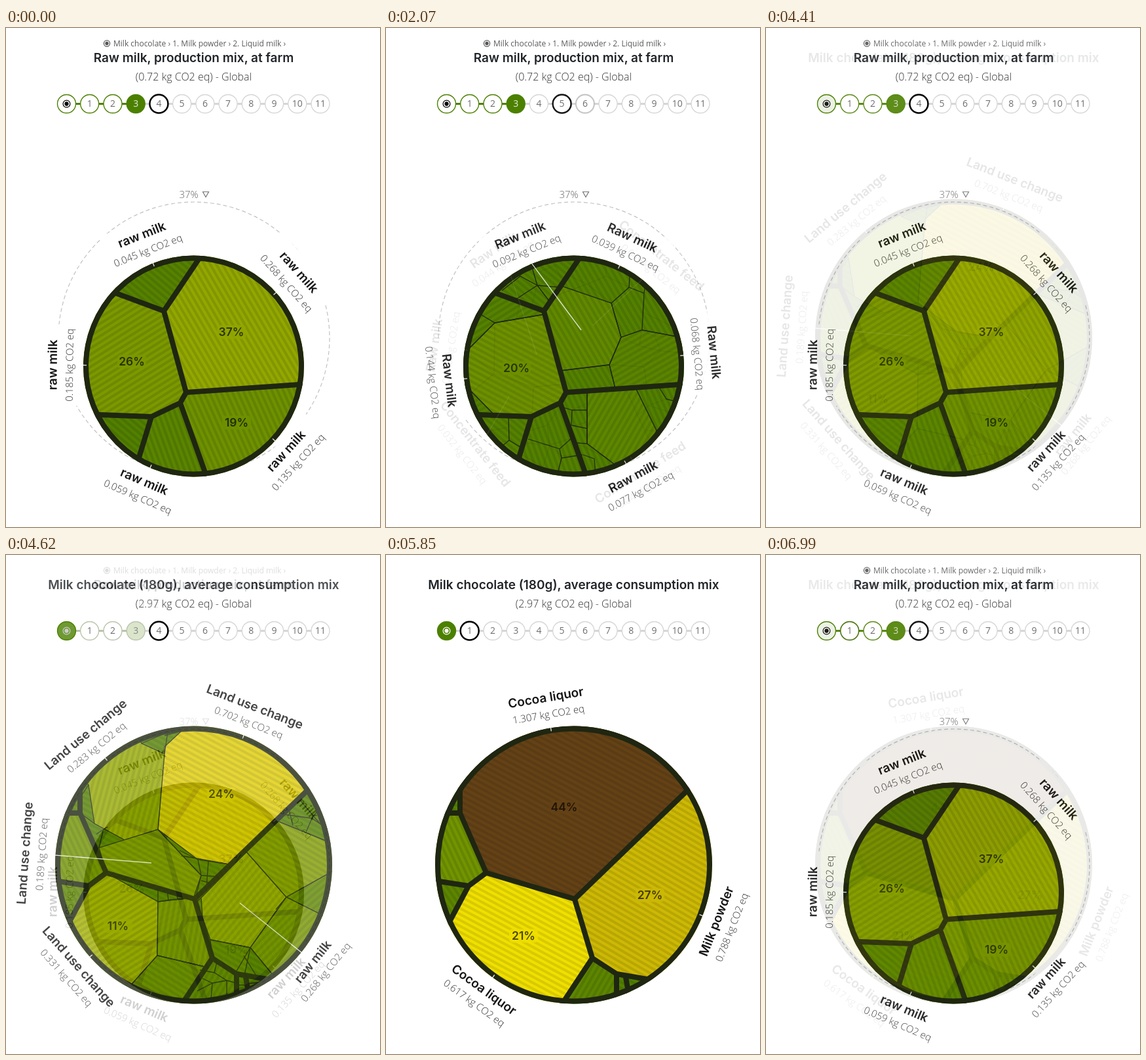
Animation, 571 px wide and 760 px high, one loop 7020 ms. Source, as an HTML page:

```html
<!DOCTYPE html>
<html lang="en">
<head>
<meta charset="utf-8">
<title>Footprint map</title>
<style>
html, body { margin: 0; width: 100%; height: 100%; overflow: hidden; background: #fff; }
svg { display: block; width: 100%; height: 100%; }
text { font-family: "Open Sans", sans-serif; font-weight: 300; text-anchor: middle; fill: #333; }
.bold { font: 600 19px Inter, sans-serif; fill: #161616; }
.title { fill: #212529; }
.share { font: 600 17.5px Inter, sans-serif; fill: #000; fill-opacity: .68; }
.crumbs { font-weight: 400; font-size: 12px; fill: #5a5a5a; text-anchor: start; }
</style>
</head>
<body>
<svg viewBox="0 0 571 760" xmlns="http://www.w3.org/2000/svg">
  <defs id="defs"></defs>
  <use id="base"/>
  <use id="over"/>
</svg>
<script>
const INK = '#1f2611', GREEN = '#4c8000', GREY = '#d6d6d6';
const HOLD = 900, STEP = 30, SPAN = 1170;
const ORDER = ['farm4', 'farm5', 'farm6', 'farm4', 'bar4', 'bar1'];

const milkDisc = { id: 'milk', x: 286.5, y: 515, r: 168.5 };
const barDisc = { id: 'bar', x: 286.5, y: 472, r: 211.5 };

// Borders between the main areas of each disc
const milkWalls = 'M160 401L241 431L299 345M241 431L275 555L470 541.5M275 555L266 571L308 688' +
  'M266 571L222 592L130 588.5M222 592L200 664';
const barWalls = 'M470 349L288 524L153 484L113 393V350M113 393H80M153 484L126 504L74 496M126 504L94 564' +
  'M288 524L315 614L268 685M315 614L352 638L410 648M352 638V672M366 643L371 672';

// Cells: value in kg, stripe angle, corners
const milkCells = [
  [.045, -50, '160,401 241,431 299,345 200,320'],
  [.268, -30, '241,431 299,345 470,330 480,541 275,555'],
  [.185, 58, '241,431 275,555 266,571 222,592 110,588 100,450 160,401'],
  [.135, -24, '275,555 480,541 470,690 308,690 266,571'],
  [.059, -20, '266,571 308,690 198,690 200,664 222,592'],
  [.03, -50, '222,592 200,664 120,680 110,588']
];
const barSmall = [
  [.15, -25, '153,484 113,393 70,393 70,495 126,504'],
  [.07, -35, '126,504 70,495 80,575 94,564'],
  [.07, 30, '315,614 352,638 352,690 268,685']
];
const greens = milkCells.map(([, a, pts], i) => [.03 + i % 3 * .006, a, pts]);

const scenes = {
  farm4: {
    disc: milkDisc, walls: milkWalls, ring: 4, cells: milkCells, thin: [],
    shares: [[344, 463, 37, .268], [192, 508, 26, .185], [352, 601, 19, .135]],
    labels: [[48.3, 'raw milk', .268], [-89.5, 'raw milk', .185], [-21.6, 'raw milk', .045],
      [132.5, 'raw milk', .135], [-156.8, 'raw milk', .059]]
  },
  farm5: {
    disc: milkDisc, walls: milkWalls, ring: 5,
    cells: [...greens,
      [.092, -30, '241,431 268,393 344,419 359,471 341,513 266,522'],
      [.068, 60, '359,471 391,460 460,473 460,542 350,549 341,513'],
      [.144, -62, '166,449 242,436 275,555 266,571 222,592 165,589 118,541 118,497'],
      [.077, 30, '307,554 381,548 413,613 390,664 352,667 307,633']],
    thin: [
      'M268 393L344 419L371 395L373 362M371 395L394 404L398 376M394 404L391 460L455 472M344 419L359 471L391 460' +
      'M359 471L341 513L350 549M341 513L266 522',
      'M307 554V633L352 667M271 578L284 582H307M284 582L283 605L307 610M307 633L292 632M381 548L413 613L445 600' +
      'M416 546L428 565L450 571M301 650L318 656L320 682',
      'M217 626L265 641L283 625M265 641L268 655L300 650M268 655L261 682M187 592L188 628L208 640M188 628L178 636',
      'M166 449L242 436M166 449L134 430M166 449L118 497M118 541L165 589',
      'M221 358L231 392L266 395M231 392L197 414M231 392L250 417M231 392L205 378L177 400'],
    shares: [[199, 518, 20, .144]],
    labels: [[-22.3, 'Raw milk', .092, 298, 460], [24.6, 'Raw milk', .039], [84.4, 'Raw milk', .068],
      [151.7, 'Raw milk', .077], [-96.6, 'Raw milk', .144]]
  },
  farm6: {
    disc: milkDisc, walls: milkWalls, ring: 6,
    cells: [...greens,
      [.049, -30, '241,431 264,406 307,390 344,419 359,471 341,513 266,522'],
      [.044, 58, '166,449 242,436 273,542 225,547 165,526'],
      [.04, -62, '166,449 165,526 130,556 118,497'],
      [.032, 40, '165,526 225,547 223,592 140,588 130,556'],
      [.041, 30, '307,554 366,549 384,590 408,640 360,666 307,640']],
    thin: [
      'M264 406L307 390L344 419L359 471L341 513L350 549M307 390L277 376M307 390L336 378V352M336 378L371 395L373 362' +
      'M371 395L397 404L398 376M397 404L391 432L452 462M344 419L371 395M391 432L390 460L359 471M390 460L410 470L453 468',
      'M341 513L266 522M359 471L341 513L394 516L420 492L455 495M394 516L398 546M390 460L387 484L359 471M387 484L420 492L410 470',
      'M307 554V640L360 666M271 578L284 582L307 572M284 582L286 606L307 600M366 549L384 590L408 640M384 590L401 575L448 590' +
      'M401 575L396 546M401 575L428 565L418 545M395 613L432 614M286 632L307 640M307 640L318 680',
      'M217 614L246 605L262 582M246 605L250 635L283 625M250 635L268 652L298 650M250 635L240 668L208 650M268 652L264 682M215 632L250 635',
      'M187 592L188 628L208 640M188 628L172 632M187 608L156 614M166 449L242 436M166 449L134 430M166 449L118 497' +
      'M118 488L165 526L225 547L273 542M225 547L223 592M165 526L130 556M205 417L199 444',
      'M221 358L231 392L266 395M231 392L197 414M231 392L250 417M231 392L205 378L177 400M205 378L198 364M222 376L258 362L270 386M231 392L222 424'],
    shares: [],
    labels: [[-34.7, 'Raw milk', .044, 230, 497], [38.5, 'Concentrate feed', .049, 316, 453],
      [-81.5, 'Raw milk', .04], [-128.3, 'Concentrate feed', .032, 188, 561], [147.9, 'Concentrate feed', .041]]
  },
  bar4: {
    disc: barDisc, walls: barWalls, ring: 4, bar: true,
    cells: [...barSmall,
      [.702, -62, '232,418 242,292 268,268 300,240 480,240 470,349 340,471 293,464'],
      [.283, 15, '232,418 242,303 207,287 190,250 105,330 126,350 135,409 181,434'],
      [.189, -62, '232,418 142,446 153,484 286,523 298,488'],
      [.331, 58, '126,504 153,484 232,528 231,610 188,658 80,620 94,564'],
      [.18, 10, '232,528 251,525 288,522 314,610 303,627 231,610'],
      [.13, -58, '231,610 303,627 268,685 230,700 188,658'],
      [.268, 40, '298,522 367,452 428,521 373,598 312,586 300,552'],
      [.2, -60, '367,452 414,405 500,440 500,481 428,521'],
      [.08, 50, '428,521 500,481 510,560 488,552'],
      [.16, 45, '428,521 494,554 460,620 412,645 373,598'],
      [.08, -60, '312,586 373,598 364,640 352,638 315,614']],
    thin: [
      'M242 275L268 268M207 287L242 272M242 303L248 262M113 393L135 409M138 425L155 414M142 446L148 421M113 370L126 350' +
      'M232 418L298 488M265 450L293 464M268 458L340 471M293 464L298 488L325 490M309 467L306 506M298 488L290 520M298 496L314 500',
      'M232 528V508M246 511L248 526M260 515L262 524M276 520V523M232 528L288 522M231 610L303 627',
      'M428 521L412 540M414 405L500 440M423 395L467 401L459 420M447 371L480 410M467 401L480 384M432 388L438 412M467 401L492 418' +
      'M428 521L494 554M373 598L412 645M373 598L350 637M363 610L384 644M288 531L298 522',
      'M300 645L315 652L313 676M315 652L337 648L352 652M337 648V674M296 632L318 636L337 648M318 636L322 620M315 652L292 664' +
      'M352 655H366M369 653L392 650M373 668L392 650'],
    shares: [[329, 364, 24, .702], [171, 565, 11, .331]],
    labels: [[21.2, 'Land use change', .702], [-39.7, 'Land use change', .283], [-86, 'Land use change', .189, 222, 469],
      [-131.5, 'Land use change', .331], [129, 'raw milk', .268, 357, 530]]
  },
  bar1: {
    disc: barDisc, walls: barWalls, ring: 1, bar: true,
    cells: [...barSmall,
      [1.307, -62, '288,524 480,340 480,220 100,220 113,350 113,393 153,484'],
      [.788, -60, '288,524 480,340 520,500 440,653 352,638 315,614'],
      [.617, -62, '288,524 315,614 268,685 180,700 80,590 94,564 126,504 153,484']],
    thin: [],
    shares: [[272, 384, 44, 1.307], [403, 518, 27, .788], [210, 580, 21, .617]],
    labels: [[-9.5, 'Cocoa liquor', 1.307], [111.5, 'Milk powder', .788], [-144.2, 'Cocoa liquor', .617]]
  }
};

const $ = id => document.getElementById(id);
const text = (x, y, s, attrs = '') => `<text x="${x}" y="${y}" ${attrs}>${s}</text>`;
const circle = (x, y, r, attrs) => `<circle cx="${x}" cy="${y}" r="${r}" ${attrs}/>`;
const path = (d, w) => `<path d="${d}" fill="none" stroke="${INK}" stroke-width="${w}" stroke-linejoin="round"/>`;

// Green to yellow to brown as the value grows
function tone(v) {
  const stops = [[74, 123, 0], [240, 224, 0], [100, 66, 22]];
  const i = v < .617 ? 0 : 1;
  const k = i ? (v - .617) / .69 : v / .617;
  return `rgb(${stops[i].map((c, n) => Math.round(c + (stops[i + 1][n] - c) * k))})`;
}

const angles = new Set();
function cell([v, a, pts]) {
  angles.add(a);
  return `<polygon points="${pts}" fill="${tone(v)}" stroke="${INK}" stroke-width="1.3"/>` +
    `<polygon points="${pts}" fill="url(#s${a})"/>`;
}

function radio(x, y, r, color) {
  return circle(x, y, r, `fill="none" stroke="${color}" stroke-width="1.2"`) + circle(x, y, r * .58, `fill="${color}"`);
}

function steps(level, ring) {
  const x = i => +(92.5 + 35.23 * i).toFixed(1), y = 115.5;
  let out = '';
  for (let i = 0; i < 11; i++)
    out += `<path d="M${x(i) + 14} ${y}H${x(i + 1) - 14}" stroke="${i < level ? GREEN : GREY}" stroke-width="3"/>`;
  for (let i = 0; i < 12; i++) {
    const stroke = i === ring ? '#000' : i <= level ? GREEN : GREY;
    out += circle(x(i), y, 14, `fill="${i === level ? GREEN : '#fff'}" stroke="${stroke}" stroke-width="${i === ring ? 2.5 : 1.4}"`);
    const ink = i === level ? '#fff' : i ? '#555' : '#000';
    out += i ? text(x(i), y + 4.8, i, `font-size="14" style="fill:${ink};font-weight:400" fill-opacity=".85"`) : radio(x(i), y, 5.4, ink);
  }
  return out;
}

function header(bar) {
  const crumbs = bar ? '' : radio(154, 23.5, 4.6, '#555') +
    text(164, 27.5, 'Milk chocolate › 1. Milk powder › 2. Liquid milk ›', 'class="crumbs"');
  return crumbs +
    text(286.5, 52, bar ? 'Milk chocolate (180g), average consumption mix' : 'Raw milk, production mix, at farm', 'class="bold title"') +
    text(286.5, 80, `(${bar ? 2.97 : .72} kg CO2 eq) - Global`, 'font-size="16"');
}

function parentRing() {
  return circle(287, 472, 207, 'fill="none" stroke="#c2c2c2" stroke-width="1.2" stroke-dasharray="6 4"') +
    text(279, 259, '37%', 'font-size="15" fill-opacity=".75"') +
    '<path d="M300.5 249.5H309.5L305 257.5Z" fill="none" stroke="#777" stroke-width="1.2"/>';
}

function label({ x, y, r }, [deg, name, value]) {
  const low = Math.abs(deg) > 90, sign = low ? 1 : -1;
  const at = d => sign * (r + d);
  return `<g transform="translate(${x} ${y}) rotate(${low ? deg + 180 : deg})">` +
    `<rect x="-62" y="${low ? r + 6 : -r - 68}" width="124" height="62" fill="#fff"/>` +
    text(0, at(low ? 22.5 : 47) + 6.7, name, 'class="bold"') +
    text(0, at(low ? 48 : 21) + 5.3, value.toFixed(3) + ' kg CO2 eq', 'font-size="15"') + '</g>';
}

function pointer({ x, y, r }, [deg, , , tx, ty]) {
  const a = deg * Math.PI / 180, sx = Math.sin(a), sy = -Math.cos(a);
  const at = d => `${(x + sx * d).toFixed(1)} ${(y + sy * d).toFixed(1)}`;
  return `<path d="M${at(r + 1)}L${tx ? tx + ' ' + ty : at(r - 5)}" stroke="#fff" stroke-width="1.3" stroke-opacity=".9"/>`;
}

function share([x, y, n, v]) {
  return `<rect x="${x - 22}" y="${y - 10.5}" width="44" height="21" rx="5" fill="${tone(v)}" fill-opacity=".8"/>` +
    text(x, y + 6.2, n + '%', 'class="share"');
}

function build(id, s) {
  const d = s.disc;
  return `<g id="${id}"><rect width="571" height="760" fill="#fff"/>` +
    header(s.bar) + steps(s.bar ? 0 : 3, s.ring) + (s.bar ? '' : parentRing()) +
    s.labels.map(l => label(d, l)).join('') +
    `<g clip-path="url(#${d.id})">` + circle(d.x, d.y, d.r, `fill="${tone(.035)}"`) +
    circle(d.x, d.y, d.r, 'fill="url(#s-62)"') +
    s.cells.map(cell).join('') + s.thin.map(p => path(p, 1.3)).join('') + path(s.walls, 8) + '</g>' +
    circle(d.x, d.y, d.r - 4, `fill="none" stroke="${INK}" stroke-width="8"`) +
    s.shares.map(share).join('') + s.labels.map(l => pointer(d, l)).join('') + '</g>';
}

const groups = Object.entries(scenes).map(([id, s]) => build(id, s)).join('');
const clips = [milkDisc, barDisc].map(d => `<clipPath id="${d.id}">${circle(d.x, d.y, d.r, '')}</clipPath>`).join('');
const stripes = [...angles].map(a =>
  `<pattern id="s${a}" width="8" height="8" patternUnits="userSpaceOnUse" patternTransform="rotate(${a})">` +
  '<rect width="4" height="8" fill="#000" fill-opacity=".1"/></pattern>').join('');
$('defs').innerHTML = clips + stripes + groups;

let shown = -1;
function draw(ms) {
  const t = ms % (SPAN * ORDER.length);
  const i = Math.floor(t / SPAN), p = t - i * SPAN;
  if (i !== shown) {
    $('base').setAttribute('href', '#' + ORDER[i]);
    $('over').setAttribute('href', '#' + ORDER[(i + 1) % ORDER.length]);
    shown = i;
  }
  const mix = p < HOLD ? 0 : (Math.floor((p - HOLD) / STEP) + 1) / 10;
  $('over').setAttribute('opacity', mix);
}

let start;
function tick(now) {
  start ??= now;
  draw(now - start);
  requestAnimationFrame(tick);
}
draw(0);
requestAnimationFrame(tick);
</script>
</body>
</html>
```
